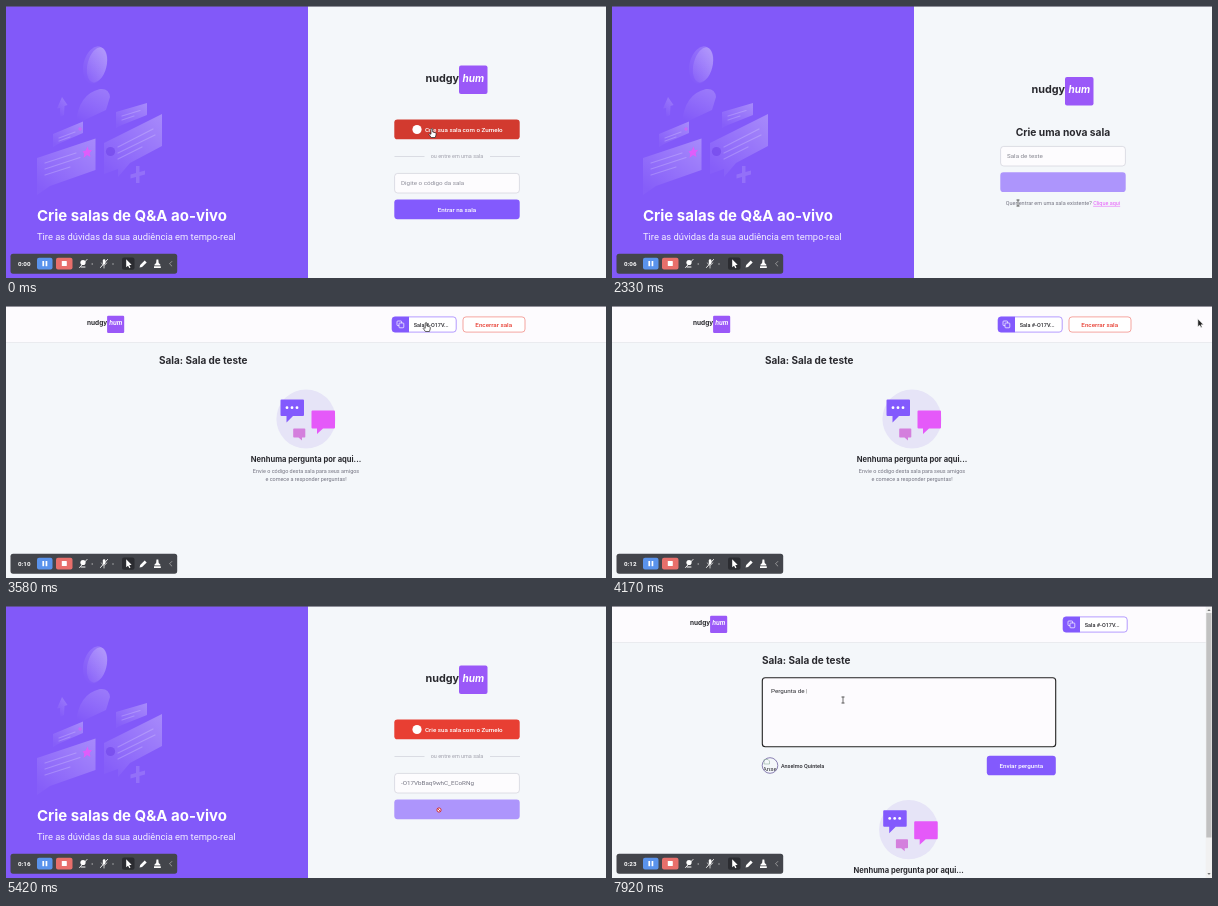
Animation of 600x272 px, one loop 8000 ms. Source, as an HTML page:

```html
<!DOCTYPE html>
<html lang="pt-BR">
<head>
<meta charset="utf-8">
<title>Salas de perguntas</title>
<style>
  html, body { margin: 0; width: 100%; height: 100%; overflow: hidden; background: #f4f7fa; }
  svg { display: block; width: 100%; height: 100%; font-family: Roboto, Arial, sans-serif; }
  text { white-space: pre; }
  .title { font-family: Inter, sans-serif; font-weight: 700; fill: #29292e; }
  .mid { font-weight: 500; }
</style>
</head>
<body>
<svg id="stage" viewBox="0 0 600 272" xmlns="http://www.w3.org/2000/svg"></svg>
<script>
const LOOP = 8000;
const PURPLE = '#835afd', RED = '#e83f33', PINK = '#e559f9', GRAY = '#737380', DARK = '#29292e', PALE = '#fdfbfe';
const BODY = 6.25, SMALL = 5.47, LARGE = 9.38;
const stage = document.getElementById('stage');

const rect = (x, y, w, h, fill, r = 0, extra = '') =>
  `<rect x="${x}" y="${y}" width="${w}" height="${h}" rx="${r}" fill="${fill}" ${extra}/>`;
const text = (x, y, str, fill, size = BODY, extra = '') =>
  `<text x="${x}" y="${y}" fill="${fill}" font-size="${size}" ${extra}>${str}</text>`;
const path = (d, fill, extra = '') => `<path d="${d}" fill="${fill}" ${extra}/>`;
const line = (d, stroke, width = .8, extra = '') =>
  path(d, 'none', `stroke="${stroke}" stroke-width="${width}" stroke-linecap="round" stroke-linejoin="round" ${extra}`);
const group = (id, body) => `<g id="${id}">${body}</g>`;
const title = (x, y, str, size, extra = '') => text(x, y, str, DARK, size, 'class="title" ' + extra);
const centered = (x, y, str, fill, size) => text(x, y, str, fill, size, 'text-anchor="middle"');
const label = (x, y, str, fill, size) => text(x, y, str, fill, size, 'class="mid" text-anchor="middle"');

const logo = (x, y, k = 1) => `<g transform="translate(${x} ${y}) scale(${k})">
  ${rect(33.5, 0, 28.5, 28.5, '#9a58f8', 2)}
  ${title(0, 16, 'nudgy', 10.8)}
  ${text(37, 16, 'hum', '#fff', 10, 'class="title" style="fill:#fff" font-style="italic"')}</g>`;

const field = (y, id) => rect(388.6, y, 124.8, 19.6, '#fdfcfe', 3.1, 'stroke="#c9cad3" stroke-width=".6"')
  + text(395, y + 12, '', '#8e8e9a', BODY, `id="${id}"`);

const block = (y, fill, id) => rect(388.3, y, 125.4, 19.8, fill, 3.1, `id="${id}"`);

const button = (y, id, str) => block(y, PURPLE, id + 'Box')
  + group(id + 'Label', label(451, y + 12.1, str, '#fff'));

const copyIcon = (x, y) => rect(x, y, 4.6, 4.6, 'none', .8, 'stroke="#fff" stroke-width=".7"')
  + rect(x + 2, y + 2, 4.8, 4.8, PURPLE, .8, 'stroke="#fff" stroke-width=".7"');

const copyButton = x => rect(x, 10.9, 64.2, 15.2, '#fff', 3, `stroke="${PURPLE}" stroke-width=".6"`)
  + path(`M${x + 3} 10.7H${x + 17}V26.3H${x + 3}Q${x} 26.3 ${x} 23.3V13.7Q${x} 10.7 ${x + 3} 10.7Z`, PURPLE)
  + copyIcon(x + 5, 15)
  + text(x + 21.8, 20.6, 'Sala #-O17V...', DARK, SMALL, 'class="mid"');

const header = (logoX, copyX) => rect(0, 0, 600, 272, '#f4f7fa')
  + rect(0, 0, 600, 36.5, PALE) + rect(0, 36.4, 600, .6, '#e2e3e8')
  + logo(logoX, 9.8, .6) + copyButton(copyX);

const emptyState = (dx, dy) => `<g transform="translate(${dx} ${dy})">
  <circle cx="300" cy="113" r="29.6" fill="#e6e4f7"/>
  ${path('M275.5 93.5H297Q298 93.5 298 94.5V109Q298 110 297 110H287L280.5 116.5V110H275.5Q274.5 110 274.5 109V94.5Q274.5 93.5 275.5 93.5Z', PURPLE)}
  ${[281, 286, 291].map(x => `<circle cx="${x}" cy="101.7" r="1.4" fill="#fff"/>`).join('')}
  ${path('M306.5 104.5H328Q329 104.5 329 105.5V121.5Q329 122.5 328 122.5H317L311 128V122.5H306.5Q305.5 122.5 305.5 121.5V105.5Q305.5 104.5 306.5 104.5Z', PINK)}
  ${path('M288 122.5H298.5Q299.3 122.5 299.3 123.3V130.7Q299.3 131.5 298.5 131.5H296V134.5L292.5 131.5H288Q287.2 131.5 287.2 130.7V123.3Q287.2 122.5 288 122.5Z', '#d47fdd')}
  ${title(300, 156, 'Nenhuma pergunta por aqui...', 7.55, 'text-anchor="middle"')}
  ${centered(300, 167.3, 'Envie o código desta sala para seus amigos', GRAY, SMALL)}
  ${centered(300, 175.3, 'e comece a responder perguntas!', GRAY, SMALL)}</g>`;

const fade = (id, [x1, y1, x2, y2], top, bottom) => `<linearGradient id="${id}" x1="${x1}" y1="${y1}" x2="${x2}" y2="${y2}">
  <stop stop-color="#fff" stop-opacity="${top}"/><stop offset="1" stop-color="#fff" stop-opacity="${bottom}"/></linearGradient>`;

const hero = rect(0, 0, 302, 272, '#8259f9')
  + `<g transform="rotate(14 89.5 59)"><ellipse cx="89" cy="59" rx="11.5" ry="19" fill="url(#body)"/>
     <ellipse cx="91" cy="58.5" rx="9.5" ry="18" fill="url(#glow)"/></g>`
  + path('M70 118Q72 88 94 83Q103 82 104 91L100 104Z', 'url(#body)')
  + path('M47 128L77 115.5V127L53 137.5L47 141Z', 'url(#card)')
  + path('M110 106L141 97V109L116 119L110 122Z', 'url(#card)')
  + path('M31 152L89.5 132.5V164L44 180L31 189Z', 'url(#card)')
  + path('M98 137L156 108V140L124 157L112 171V163L98 168Z', 'url(#card)')
  + line('M53 132L69 126M53 135L64 131M116 110L134 104.5M116 114L128 110M39 157L70 147M39 163L74 151.5M39 169L64 161M112 141L147 123M112 147L149 129M112 153L136 141', '#fff', 1.2, 'opacity=".2"')
  + `<circle cx="104.5" cy="145.5" r="4.6" fill="#6f43e8" opacity=".6"/>
     <circle cx="74" cy="123" r="1.7" fill="${PINK}" opacity=".6"/>`
  + path('M81.5 140.5L82.7 144L86 144L83.7 147L84.5 151L81 149L77.6 152L78.3 147.7L76.5 145.5L79.7 144.5Z', PINK, 'opacity=".9"')
  + path('M56 91L61.5 99L58.5 100L58 109L54 111V102L51 102.5Z', 'url(#body)')
  + path('M130 160H133.5V166L139 164.5V168.5L133.5 170V177H130V171L124.5 172.5V168.5L130 167Z', '#fff', 'opacity=".14"')
  + title(31, 215, 'Crie salas de Q&amp;A ao-vivo', 15, 'style="fill:#fff"')
  + text(31, 234.4, 'Tire as dúvidas da sua audiência em tempo-real', '#f4efff', LARGE);

const login = logo(419.5, 59.5) + block(113.5, RED, 'signIn')
  + '<circle cx="411" cy="123.5" r="4.6" fill="#fff"/>'
  + text(419, 125.7, 'Crie sua sala com o Zumelo', '#fff', BODY, 'class="mid"')
  + rect(388.5, 150.2, 30, .5, '#bfc1ca') + rect(484, 150.2, 30, .5, '#bfc1ca')
  + centered(451, 152.2, 'ou entre em uma sala', '#a0a0ac', SMALL)
  + field(167.4, 'codeText') + button(193.4, 'join', 'Entrar na sala');

const create = logo(419.5, 71) + title(451, 130, 'Crie uma nova sala', 10.25, 'text-anchor="middle"')
  + field(140.4, 'roomText') + button(166.3, 'create', 'Criar sala')
  + centered(451, 198.9, `Quer entrar em uma sala existente? <tspan fill="${PINK}" text-decoration="underline">Clique aqui</tspan>`, GRAY, SMALL);

const admin = header(81, 386)
  + rect(457, 10.9, 62, 15.2, '#fff', 3, 'stroke="#ef6a61" stroke-width=".6"')
  + label(487.7, 20.8, 'Encerrar sala', RED)
  + title(153, 57.5, 'Sala: Sala de teste', 9.95) + emptyState(0, 0);

const room = header(78, 451)
  + title(150, 57.5, 'Sala: Sala de teste', 9.95)
  + rect(150.3, 71.8, 293.4, 69, PALE, 3, 'id="area"')
  + text(159, 86.6, '', DARK, BODY, 'id="question"')
  + `<circle cx="158" cy="159.5" r="7.8" fill="#f4f7fa" stroke="#5b4d92" stroke-width=".7"/>
     <clipPath id="face"><circle cx="158" cy="159.5" r="7.5"/></clipPath>`
  + line('M152.5 153.5H156L157.5 155V158H152.5Z', '#8fae9c', .6)
  + text(150.8, 164.5, 'Anse', DARK, BODY, 'clip-path="url(#face)"')
  + text(169, 161.5, 'Anselmo Quintela', DARK, SMALL, 'class="mid"')
  + rect(374.8, 149.7, 69, 19.6, PURPLE, 3.1) + label(409.3, 161.7, 'Enviar pergunta', '#fff')
  + emptyState(-3.3, 110.7)
  + rect(593.7, 0, 6.3, 272, '#f1f1f1') + rect(594.3, 7, 5.2, 224.5, '#c1c1c1')
  + path('M595.3 5L597 3L598.7 5ZM595.3 267L597 269L598.7 267Z', '#777');

const toolbar = rect(4.5, 247.7, 166.7, 20, '#43454b', 2.6)
  + text(12, 260, '0:00', '#fff', BODY, 'id="clock" font-weight="700"')
  + rect(31, 251.8, 15.5, 11.6, '#5a93ec', 2) + rect(36.4, 255, 1.7, 5.2, '#fff') + rect(39.6, 255, 1.7, 5.2, '#fff')
  + rect(50, 251.8, 16.5, 11.6, '#e86f6b', 2) + rect(55.8, 255, 5, 5, '#fff', .6)
  + '<circle cx="77" cy="256.5" r="2.6" fill="#fff"/>' + line('M75 261H79', '#fff', 1)
  + line('M73.5 261.5L81 253.5M94.5 261.5L101.5 253.5', '#fff', .9)
  + rect(96.8, 253.3, 2.6, 5, '#fff', 1.3) + line('M95.5 257Q98 261.5 100.7 257M98 259.5V262', '#fff', .7)
  + '<circle cx="86.2" cy="258" r=".7" fill="#bbb"/><circle cx="107" cy="258" r=".7" fill="#bbb"/>'
  + rect(116, 251.5, 12.5, 12.2, '#2b2c31', 2)
  + path('M120.2 253.3V261.3L122 259.7L123.4 262.2L124.5 261.6L123.2 259.2L125.6 258.8Z', '#fff')
  + path('M133.6 261.6L134.2 259L138.7 254.4L140.7 256.4L136.1 261Z', '#fff')
  + path('M150.5 253.5H152.3L152.7 257L154.3 258.5V259.5H148.5V258.5L150.1 257ZM148 260.3H154.8V262H148Z', '#fff')
  + line('M165.8 255.5L163.5 257.8L165.8 260', '#aaa');

const pointers = {
  arrow: path('M0 0V8L1.9 6.4L3.2 9L4.4 8.4L3.2 6H5.7Z', '#222', 'stroke="#fff" stroke-width=".6"'),
  hand: path('M-1 -4Q0 -5 .7 -4V-1L3.6 -.2Q4.4 .2 4 2L3.2 4.5H-.8L-3 1.5Q-3 .3 -1 1.2Z', '#fff', 'stroke="#222" stroke-width=".7"'),
  beam: line('M-1.2 -3H1.2M0 -3V3M-1.2 3H1.2', '#333', .7),
  denied: '<circle r="2.1" fill="#fff" stroke="#cf2f35" stroke-width="1"/>' + line('M-1.4 -1.4L1.4 1.4', '#cf2f35', .9)
};

stage.innerHTML = `<defs>${fade('glow', [.7, 0, .3, 1], .24, .05)}${fade('body', [.8, 0, .3, 1], .2, 0)}${fade('card', [1, 0, .2, 1], .3, .03)}</defs>`
  + rect(0, 0, 600, 272, '#f4f7fa')
  + group('hero', hero) + group('login', login) + group('create', create)
  + group('admin', admin) + group('room', room)
  + rect(0, 0, 600, .8, '#4b4a58', 0, 'opacity=".75"') + toolbar
  + group('cursor', Object.entries(pointers).map(([id, body]) => group(id, body)).join(''));

const el = Object.fromEntries([...stage.querySelectorAll('[id]')].map(node => [node.id, node]));
const show = (id, on) => { el[id].style.display = on ? '' : 'none'; };

const scenes = [[0, 'login'], [670, 'create'], [2500, 'admin'], [4330, 'login'], [5670, 'room']];

// time, x, y, pointer
const track = [
  [0, 426, 127, 'hand'], [600, 426, 127, 'hand'], [670, 427, 129, 'arrow'],
  [900, 440, 152, 'beam'], [1780, 440, 152, 'beam'], [1950, 445, 177, 'hand'],
  [2080, 445, 177, 'denied'], [2300, 406, 197, 'beam'], [2500, 406, 197, 'arrow'],
  [2670, 406, 190, 'arrow'], [3080, 421, 21, 'hand'], [3800, 420, 21, 'hand'],
  [3850, 425, 20, 'arrow'], [4250, 604, 12, 'arrow'], [4420, 604, 100, 'arrow'],
  [4700, 440, 178, 'beam'], [5080, 440, 178, 'beam'], [5250, 433, 204, 'hand'],
  [5330, 433, 204, 'denied'], [5670, 433, 204, 'arrow'], [5800, 433, 204, 'arrow'],
  [6080, 251, 95, 'beam'], [6500, 251, 95, 'beam'], [6830, 231, 94, 'beam'], [LOOP, 231, 94, 'beam']
];

const clamp = v => Math.max(0, Math.min(1, v));
const typed = (str, t, from, to) => str.slice(0, Math.floor(clamp((t - from) / (to - from)) * str.length));

function setField(node, value, hint, color) {
  node.textContent = value || hint;
  node.setAttribute('fill', value ? color : '#8e8e9a');
}

function setBusy(id, busy) {
  el[id + 'Box'].setAttribute('opacity', busy ? .62 : 1);
  show(id + 'Label', !busy);
}

function placeCursor(t) {
  const i = Math.max(0, track.findIndex(key => key[0] > t) - 1);
  const [t0, x0, y0, kind] = track[i], [t1, x1, y1] = track[i + 1];
  const p = clamp((t - t0) / (t1 - t0)), k = p * p * (3 - 2 * p);
  el.cursor.setAttribute('transform', `translate(${x0 + (x1 - x0) * k} ${y0 + (y1 - y0) * k})`);
  for (const id in pointers) show(id, id === kind);
}

function render(t) {
  const scene = scenes.filter(([start]) => start <= t).pop()[1];
  for (const id of ['login', 'create', 'admin', 'room']) show(id, id === scene);
  show('hero', scene === 'login' || scene === 'create');

  el.signIn.setAttribute('fill', t < 670 ? '#d23a2f' : RED);
  setField(el.roomText, typed('Sala de teste', t, 1000, 1750), 'Nome da sala', t > 2080 ? '#85858f' : DARK);
  setBusy('create', t >= 2080);
  setField(el.codeText, t >= 4900 ? '-O17VbBaq9whC_ECoRNg' : '', 'Digite o código da sala', t >= 5330 ? GRAY : DARK);
  setBusy('join', t >= 5330);

  const focused = t >= 6830;
  el.area.setAttribute('stroke', focused ? '#222' : '#eceaf2');
  el.area.setAttribute('stroke-width', focused ? 1.1 : .5);
  const question = typed('Pergunta de ', t, 7000, 7830);
  setField(el.question, question, 'O que você quer perguntar?', DARK);
  if (question) el.question.insertAdjacentHTML('beforeend', '<tspan fill="#777">|</tspan>');

  el.clock.textContent = '0:' + String(Math.floor(t * .003002)).padStart(2, '0');
  placeCursor(t);
}

const start = performance.now();
function tick() {
  render((performance.now() - start) % LOOP);
  requestAnimationFrame(tick);
}
tick();
</script>
</body>
</html>
```
